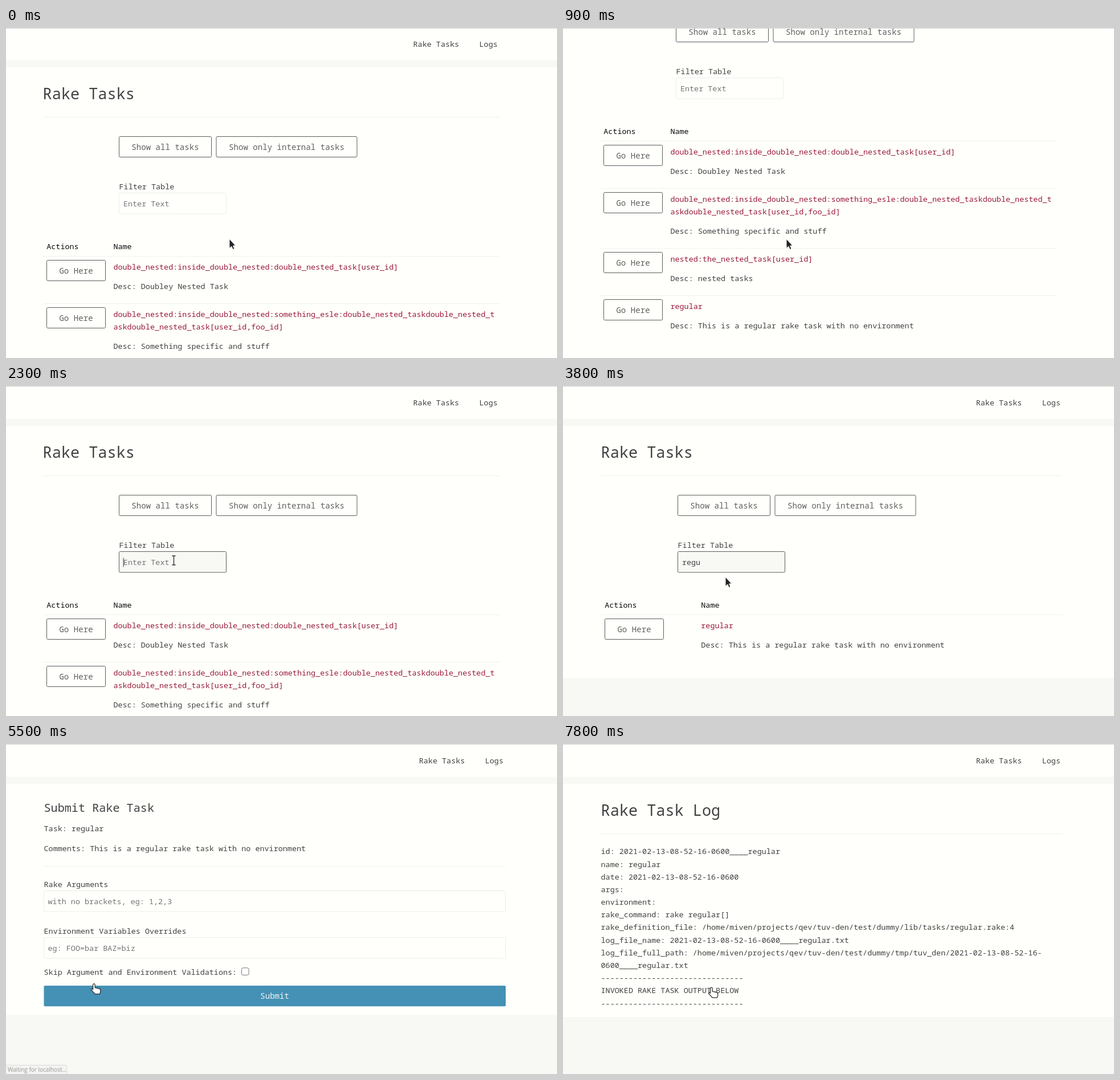
Write an HTML page that moves like this. It is 967 by 579 pixels and loops after 8 s.

```html
<!DOCTYPE html>
<html lang="en">
<head>
<meta charset="utf-8">
<title>Rake Tasks</title>
<style>
html, body { margin: 0; width: 100%; height: 100%; overflow: hidden; background: #fffffc; }
svg { display: block; width: 967px; height: 579px; }
text { font: 13.44px "Noto Sans Mono", "DejaVu Sans Mono", monospace; fill: #414141; white-space: pre; }
.h1 { font-size: 26.88px; }
.h2 { font-size: 20.16px; }
.btn { font-size: 14.1px; fill: #606060; text-anchor: middle; }
.inv { fill: #f6f6f3; }
.link { fill: #991b38; }
.th { fill: #0a0a0a; }
.hint { fill: #757575; }
.status { font: 10px "Open Sans", sans-serif; fill: #666; }
</style>
</head>
<body>
<svg id="stage" viewBox="0 0 967 579"></svg>
<script>
const LOOP = 8000, LINE = 22.18, SHADE = '#f8f9f5', RULE = '#efefeb', INK = '#5c5c5c';
const stage = document.getElementById('stage');

const TASKS = [
  [['double_nested:inside_double_nested:double_nested_task[user_id]'], 'Doubley Nested Task'],
  [['double_nested:inside_double_nested:something_esle:double_nested_taskdouble_nested_t',
    'askdouble_nested_task[user_id,foo_id]'], 'Something specific and stuff'],
  [['nested:the_nested_task[user_id]'], 'nested tasks'],
  [['regular'], 'This is a regular rake task with no environment']
];

const LOG = [
  'id: 2021-02-13-08-52-16-0600____regular',
  'name: regular',
  'date: 2021-02-13-08-52-16-0600',
  'args:',
  'environment:',
  'rake_command: rake regular[]',
  'rake_definition_file: /home/miven/projects/qev/tuv-den/test/dummy/lib/tasks/regular.rake:4',
  'log_file_name: 2021-02-13-08-52-16-0600____regular.txt',
  'log_file_full_path: /home/miven/projects/qev/tuv-den/test/dummy/tmp/tuv_den/2021-02-13-08-52-16-',
  '0600____regular.txt',
  '-'.repeat(31),
  'INVOKED RAKE TASK OUTPUT BELOW',
  '-'.repeat(31)
];

// Step tracks: [start ms, values...]; the last entry already started applies.
const SCROLL = [[0, 1], [700, 45], [800, 150], [900, 203], [1300, 165], [1400, 85],
  [1500, 33], [1600, 12], [1700, 4], [1800, 0]];
const TYPED = [[0, ''], [2900, 'r'], [3000, 're'], [3200, 'reg'], [3300, 'regu']];
const STATUS = [[0, 0], [5000, .5], [5100, 1], [5500, .66], [5600, .33], [5700, 0]];
const POINTER = [[0, 'arrow', 392, 370], [2000, 'beam', 313, 320], [2200, 'beam', 300, 311],
  [2300, 'beam', 294.5, 306], [3800, 'arrow', 285, 335], [3900, 'arrow', 283, 375],
  [4000, 'arrow', 279, 410], [4100, 'arrow', 276, 432], [4300, 'arrow', 262, 432],
  [4400, 'arrow', 235, 430], [4500, 'arrow', 205, 427], [4600, 'hand', 170, 424],
  [4700, 'hand', 154.5, 421], [6200, 'hand', 195, 424], [6300, 'hand', 240, 427],
  [6400, 'hand', 260.5, 428], [7600, 'hand', 260.5, 427.5]];
const at = (track, t) => track.filter(k => k[0] <= t).pop().slice(1);

const SHAPES = {
  arrow: `<path d="M0 0V16.5L3.8 13L6.3 18.6L9 17.4L6.6 12H11Z" fill="#222" stroke="#fff"
    stroke-width="1" stroke-linejoin="round"/>`,
  beam: ['#fff" stroke-width="3', '#222" stroke-width="1.3'].map(s =>
    `<path d="M-3 -8H-1Q0 -8 0 -7V7Q0 8 -1 8H-3M3 -8H1Q0 -8 0 -7M0 7Q0 8 1 8H3"
      fill="none" stroke="${s}"/>`).join(''),
  hand: `<path d="M-1.9 10V1.4a1.8 1.8 0 0 1 3.6 0V6.6l7 1.4q2.6 .5 2.6 3v1.4q0 2-.8 3.6
    l-.6 1.7h-8.4l-1.2-1.8-5-5.2q-.9-1.6 .6-2.2q1.4-.2 2.2 1.5z" fill="#fff" stroke="#333"
    stroke-width="1.3" stroke-linejoin="round"/>`
};

const text = (x, y, s, cls = '') => `<text x="${x}" y="${y}" class="${cls}">${s}</text>`;
const rect = (x, y, w, h, fill, stroke = 'none', rx = 0) =>
  `<rect x="${x}" y="${y}" width="${w}" height="${h}" rx="${rx}" fill="${fill}" stroke="${stroke}"/>`;
const rule = (x, y, w) => rect(x, y, w, 1, RULE);
const field = (x, y, w, focus) =>
  rect(x, y, w, 36.5, focus ? SHADE : 'none', focus ? INK : '#ececE8', 2);

function button(x, y, w, label, hover = 0) {
  const fill = hover ? `rgba(90,90,88,${.7 * hover})` : 'none';
  return rect(x, y, w, 36, fill, hover ? '#7b7b79' : INK, 2) +
    text(x + w / 2, y + 23.2, label, hover ? 'btn inv' : 'btn');
}

function header(wide) {
  const x = wide ? 724.7 : 714.5;
  return text(x, 34, 'Rake Tasks') + text(x + 116, 34, 'Logs') + rect(0, 57.5, 967, 12.5, SHADE);
}

const foot = y => rect(0, y, 967, 579 - y, SHADE);

function squiggle(x, y, w) {
  let d = `M${x} ${y}`;
  for (let i = 2; i <= w; i += 2) d += `L${x + i} ${y + (i / 2 % 2 ? 1.6 : 0)}`;
  return `<path d="${d}" fill="none" stroke="#d8404e"/>`;
}

function listPage(t) {
  const [typed] = at(TYPED, t);
  const wide = t >= 3000;
  const left = wide ? 66.5 : 64.5, width = wide ? 810 : 802;
  const x = wide ? 201.5 : 198.5, col = wide ? 242.3 : 188.4;
  const focus = t >= 2200 && t < 4900;
  const caret = focus && !(t >= 3800 && t < 4300);
  const hover = t >= 4700 ? 1 : t >= 4600 ? .6 : 0;
  let s = header(wide) + text(left, 125.8, 'Rake Tasks', 'h1') + rule(left, 157, width) +
    button(x, 191.5, 162, 'Show all tasks') +
    button(x + 170.5, 191.5, 247, 'Show only internal tasks') +
    text(x, 283.6, 'Filter Table') + field(x, 290.5, 188, focus) +
    text(x + 7.4, 314, typed || 'Enter Text', typed ? '' : 'hint');
  if (t >= 4300) s += squiggle(x + 7.5, 315.3, 32);
  if (caret) s += rect(x + 7.2 + typed.length * 8.064, 301.5, 1, 16, '#333');
  s += text(left + 6.7, 389, 'Actions', 'th') + text(col, 389, 'Name', 'th');

  let y = 402;
  for (const [names, desc] of wide ? TASKS.slice(3) : TASKS) {
    const extra = names.length - 1;
    s += rule(left, y - 1, width) + button(left + 7, y + 6.5, 103, 'Go Here', hover);
    names.forEach((n, i) => s += text(col, y + 22.6 + i * LINE, n, 'link'));
    s += text(col, y + 57.3 + extra * LINE, 'Desc: ' + desc);
    y += 83 + extra * 22;
  }
  return s + (wide ? foot(512) : '');
}

function formPage(t) {
  const x = 66.5, w = 810;
  const blue = t >= 6300 ? '#7cb2cb' : t >= 6200 ? '#629fc0' : '#4491b5';
  return header(true) + text(x, 118.6, 'Submit Rake Task', 'h2') +
    text(x, 153.4, 'Task: regular') +
    text(x, 187.5, 'Comments: This is a regular rake task with no environment') +
    rule(x, 214, w) +
    text(x, 250.6, 'Rake Arguments') + field(x, 257.5, w) +
    text(x + 7, 281, 'with no brackets, eg: 1,2,3', 'hint') +
    text(x, 332.6, 'Environment Variables Overrides') + field(x, 339.5, w) +
    text(x + 7, 362.7, 'eg: FOO=bar BAZ=biz', 'hint') +
    text(x, 404.7, 'Skip Argument and Environment Validations:') +
    rect(413.5, 392.8, 12.6, 12.6, '#fff', '#767676', 2.5) +
    rect(x, 424, w + .5, 36.3, blue, 'none', 2) + text(471.6, 447, 'Submit', 'btn inv') +
    foot(475);
}

function logPage() {
  return header(true) + text(66.5, 125.8, 'Rake Task Log', 'h1') + rule(66.5, 157, 810) +
    LOG.map((line, i) => text(66.5, 193.4 + i * LINE, line)).join('') + foot(479);
}

function draw(t) {
  const page = t < 5300 ? listPage(t) : t < 7800 ? formPage(t) : logPage();
  const [shape, x, y] = at(POINTER, t), [fade] = at(STATUS, t);
  stage.innerHTML = rect(0, 0, 967, 579, '#fffffc') +
    `<g transform="translate(0 ${-at(SCROLL, t)[0]})">${page}</g>` +
    rect(0, 0, 967, 1, '#d3d3d0') +
    (fade ? `<g opacity="${fade}">${rect(-2, 563.5, 109, 18, '#f1f2ef', '#cfcfcc', 2)}
      ${text(3, 575, 'Waiting for localhost…', 'status')}</g>` : '') +
    `<g transform="translate(${x} ${y})">${SHAPES[shape]}</g>`;
}

let shown = -1;
function tick() {
  const t = Math.floor(performance.now() % LOOP / 100) * 100;
  if (t !== shown) draw(shown = t);
  requestAnimationFrame(tick);
}
tick();
</script>
</body>
</html>
```
